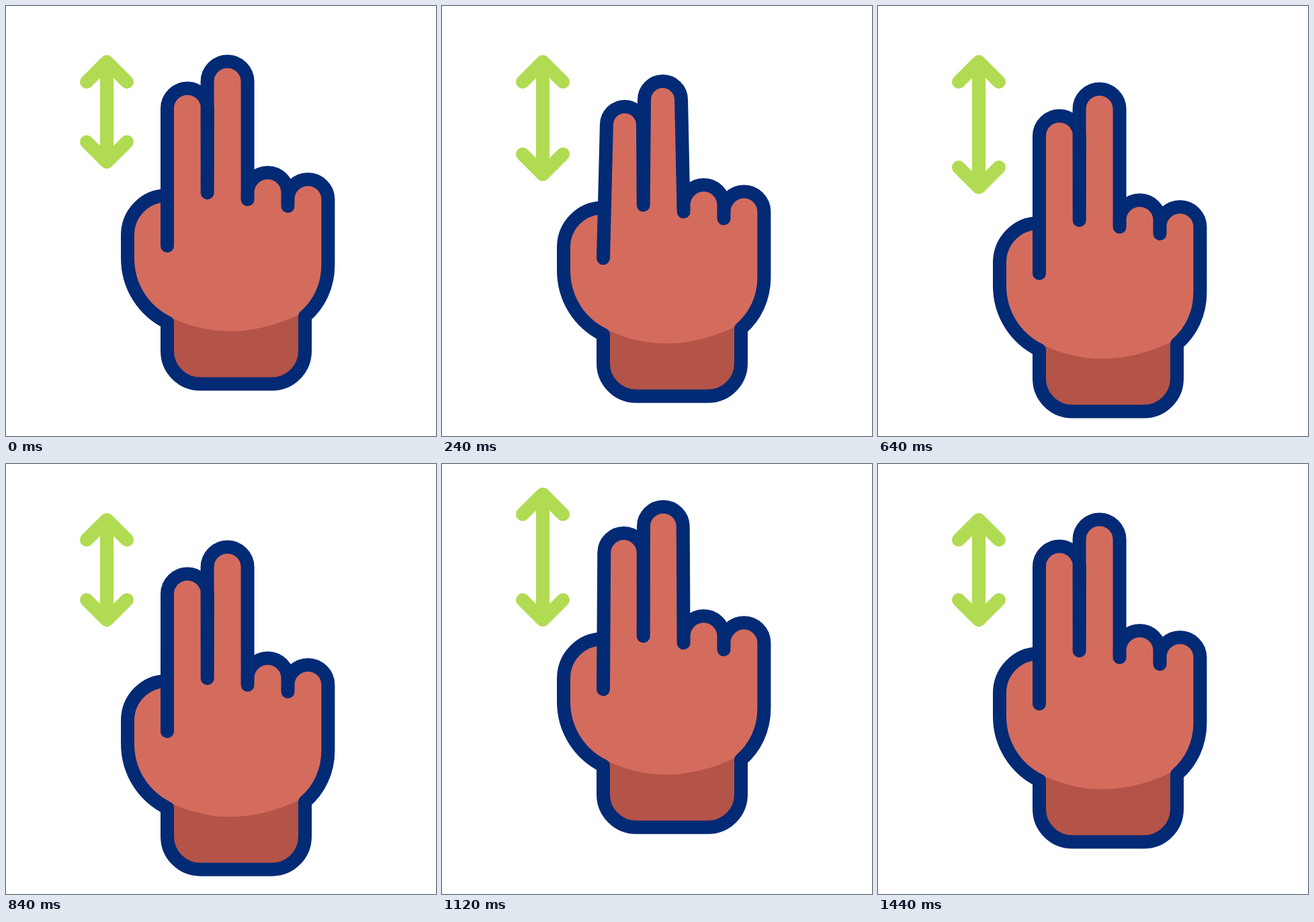
Write an HTML page with a canvas that moves like this. It is 640x640 px and loops after 1.48 s.

```html
<!DOCTYPE html>
<html lang="en">
<head>
<meta charset="utf-8">
<title>Two-finger vertical swipe</title>
<style>
  html, body { margin: 0; width: 100%; height: 100%; overflow: hidden; background: #fff; }
  canvas { display: block; width: 640px; height: 640px; }
</style>
</head>
<body>
<canvas id="stage" width="640" height="640"></canvas>
<script>
const ctx = document.getElementById('stage').getContext('2d');
const NAVY = '#032a75', SKIN = '#d46c5d', SHADE = '#b45348', LIME = '#b1db52';
const LOOP = 1480, STEP = 40;
const REACH = 41, LIFT = 26.5;

const mix = (a, b, k) => a + (b - a) * k;
const progress = (t, from, to) => Math.min(1, Math.max(0, (t - from) / (to - from)));
const smooth = u => u * u * (3 - 2 * u);
const ease = (t, from, to) => smooth(progress(t, from, to));
// Rises to 1 halfway through the interval and falls back to 0.
const pulse = (t, from, to) => smooth(1 - Math.abs(2 * progress(t, from, to) - 1));

function pose(t) {
  const down = ease(t, 41, 470);
  const retract = ease(t, 600, 833);
  const up = ease(t, 832, 1176);
  const settle = ease(t, 1176, 1440);
  return {
    handY: REACH * down - (REACH + LIFT) * up + LIFT * settle,
    arrowTop: -REACH * (up - settle),
    arrowBottom: REACH * (down - retract),
    bend: pulse(t, 41, 470) + pulse(t, 832, 1176)
  };
}

function finger(path, x, y, r, endX, endY) {
  path.lineTo(x - r, y);
  path.arc(x, y, r, Math.PI, 0);
  path.lineTo(endX, endY);
}

function addFingers(path, bend) {
  finger(path, mix(270, 272, bend), mix(152.5, 158.5, bend), mix(30, 27, bend), 299.7, 278);
  finger(path, mix(329.6, 328.5, bend), mix(112.5, 121.5, bend), mix(30, 27.5, bend), 359.6, 288);
  finger(path, 389.5, 278, 30, 419.5, 298);
  finger(path, 449.4, 288, 30, 479.4, 385);
}

function addPalm(path) {
  path.bezierCurveTo(479.4, 417, 466, 444, 445, 462);
  path.lineTo(445, 513);
  path.arcTo(445, 562.5, 396, 562.5, 49);
  path.lineTo(289, 562.5);
  path.arcTo(240, 562.5, 240, 513, 49);
  path.lineTo(240, 471);
  path.bezierCurveTo(204, 453, 181, 417, 181, 375);
  path.lineTo(181, 341);
  path.bezierCurveTo(181, 309, 206, 283, 238, 282);
}

function drawHand(y, bend) {
  const skin = new Path2D();
  skin.moveTo(240, 282);
  addFingers(skin, bend);
  addPalm(skin);
  skin.closePath();

  const outline = new Path2D();
  outline.moveTo(240, 357);
  addFingers(outline, bend);
  addPalm(outline);

  const wrist = new Path2D();
  wrist.moveTo(240, 461);
  wrist.quadraticCurveTo(337, 510, 445, 455);
  wrist.lineTo(445, 513);
  wrist.arcTo(445, 562.5, 396, 562.5, 49);
  wrist.lineTo(289, 562.5);
  wrist.arcTo(240, 562.5, 240, 513, 49);
  wrist.closePath();

  ctx.save();
  ctx.translate(0, y);
  ctx.fillStyle = SKIN;
  ctx.fill(skin);
  ctx.fillStyle = SHADE;
  ctx.fill(wrist);
  ctx.strokeStyle = NAVY;
  ctx.stroke(outline);
  ctx.restore();
}

function drawArrow(top, bottom) {
  ctx.strokeStyle = LIME;
  ctx.beginPath();
  ctx.moveTo(150, top);
  ctx.lineTo(150, bottom);
  for (const [tip, wing] of [[top, 30], [bottom, -30]]) {
    ctx.moveTo(120, tip + wing);
    ctx.lineTo(150, tip);
    ctx.lineTo(180, tip + wing);
  }
  ctx.stroke();
}

function render(now) {
  const t = Math.floor((now % LOOP) / STEP) * STEP;
  const { handY, arrowTop, arrowBottom, bend } = pose(t);
  ctx.fillStyle = '#fff';
  ctx.fillRect(0, 0, 640, 640);
  ctx.lineWidth = 20;
  ctx.lineCap = ctx.lineJoin = 'round';
  drawArrow(83 + arrowTop, 232.3 + arrowBottom);
  drawHand(handY, bend);
}

function tick() {
  render(performance.now());
  requestAnimationFrame(tick);
}
tick();
</script>
</body>
</html>
```
